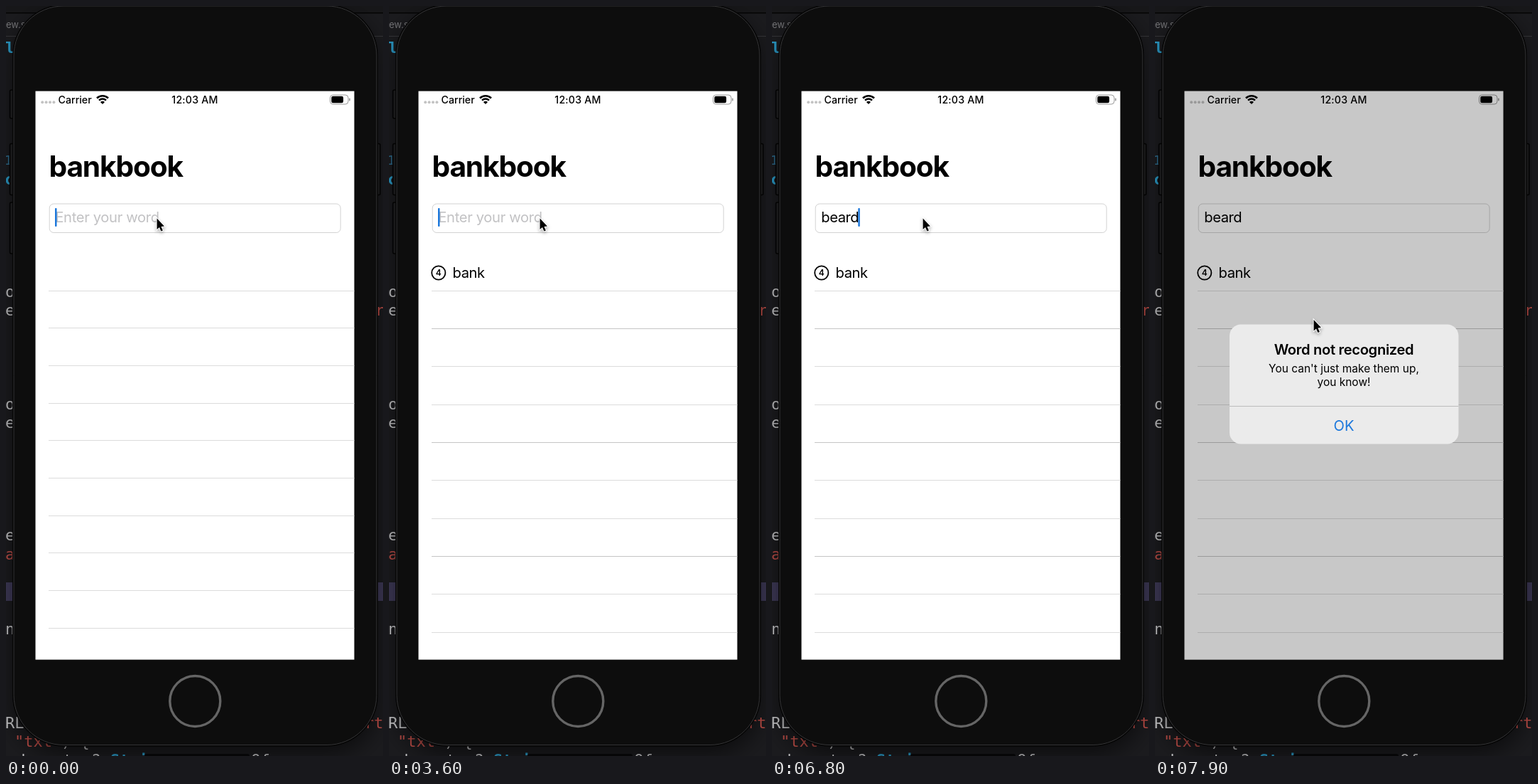
An HTML page with a canvas for the animation above (8 s loop, 531 by 1054 pixels).

```html
<!DOCTYPE html>
<html lang="en">
<head>
<meta charset="utf-8">
<title>Word game</title>
<style>
html, body { margin: 0; width: 531px; height: 1054px; overflow: hidden; background: #1c1c1f; }
canvas { display: block; }
</style>
</head>
<body>
<canvas id="stage" width="531" height="1054"></canvas>
<script>
const ctx = document.getElementById('stage').getContext('2d');
const LOOP = 8000, STEP = 100;
const UI = 'Inter, "Liberation Sans", sans-serif';
const MONO = '"DejaVu Sans Mono", monospace';
const BLUE = '#1c78dc';
const SCREEN = [41.5, 119.6, 449, 799];

const clamp = v => Math.max(0, Math.min(1, v));
const mix = (a, b, p) => a + (b - a) * p;
const smooth = p => p * p * (3 - 2 * p);

function rect(x, y, w, h, color) {
  ctx.fillStyle = color;
  ctx.fillRect(x, y, w, h);
}

function round(x, y, w, h, r, fill, stroke, line = 1) {
  ctx.beginPath();
  ctx.roundRect(x, y, w, h, r);
  if (fill) { ctx.fillStyle = fill; ctx.fill(); }
  if (stroke) { ctx.strokeStyle = stroke; ctx.lineWidth = line; ctx.stroke(); }
}

function ring(x, y, r, line, color) {
  ctx.beginPath();
  ctx.arc(x, y, r, 0, Math.PI * 2);
  ctx.strokeStyle = color;
  ctx.lineWidth = line;
  ctx.stroke();
}

function text(str, x, y, size, o = {}) {
  ctx.font = `${o.weight || 400} ${size}px ${o.font || UI}`;
  ctx.letterSpacing = (o.gap || 0) + 'px';
  ctx.textAlign = o.align || 'left';
  ctx.fillStyle = o.color || '#000';
  ctx.fillText(str, x, y);
  return ctx.measureText(str).width;
}

const code = (str, x, y, color = '#c9c9cb', weight = 400, size = 22) =>
  text(str, x, y, size, { color, weight, font: MONO });

function drawEditor() {
  rect(0, 0, 531, 1054, '#1c1c1f');
  rect(0, 0, 531, 9, '#18181a');
  rect(0, 9, 531, 1.5, '#050505');
  rect(0, 42, 531, 1, '#38383b');
  rect(0, 810, 531, 26, '#403b5a');
  text('ew.s', 0, 31, 13, { color: '#77777a' });

  const red = '#c4504a', cyan = '#2b9cc9';
  code('l', -1, 66, cyan, 700);
  code('1', -2, 223, '#2f6f92', 400, 17);
  code('c', -2, 251, cyan, 700);
  for (const [ch, y] of [['o', 409], ['e', 435], ['o', 567], ['e', 593], ['e', 751], ['n', 883]])
    code(ch, -1, y);
  code('a', -1, 778, red);
  code('r', 520, 435, red);
  code('RL', -1, 1015);
  code('rt', 505, 1015, red);
  code('"txt"', 12, 1041, red);
  code(') {', 78, 1041);
  code('rds = try? ', 1, 1067);
  code('String', 147, 1067, cyan, 700);
  code('(contentsOf', 226, 1067);
  round(195, 1051, 148, 8, 3, '#09090a');
}

function drawPhone() {
  ctx.save();
  ctx.shadowColor = 'rgba(0,0,0,.6)';
  ctx.shadowBlur = 36;
  ctx.shadowOffsetY = 12;
  round(11, 0, 511, 1038.5, 70, '#0d0d0d');
  ctx.restore();
  for (const [x, y, h] of [[5.5, 118, 40], [5.5, 193.5, 72], [5.5, 276, 72], [518, 193.5, 72]])
    round(x, y, 9, h, 2, '#19191a', '#030303', 1.5);
  round(10.5, -.5, 512, 1039.5, 71, '#0d0d0d', '#050505', 3);
  round(11, 0, 511, 1038.5, 70, '#0d0d0d', '#353537', 1);
  ring(266.3, 977, 35.5, 3.4, '#656565');
}

function drawStatus() {
  for (let i = 0; i < 4; i++) {
    ctx.beginPath();
    ctx.arc(51.2 + i * 5.4, 135.3, 2, 0, 7);
    ctx.fillStyle = '#c3c3c3';
    ctx.fill();
  }
  text('Carrier', 73.5, 136.5, 14.2, { weight: 500 });
  text('12:03 AM', 266, 136.5, 14.2, { weight: 500, align: 'center', gap: .2 });

  const a = -Math.PI * .75, b = -Math.PI * .25;
  for (const r of [11.3, 7]) {
    ctx.beginPath();
    ctx.arc(136, 137.5, r, a, b);
    ctx.strokeStyle = '#000';
    ctx.lineWidth = 2.6;
    ctx.stroke();
  }
  ctx.beginPath();
  ctx.moveTo(136, 138);
  ctx.arc(136, 138, 4.3, a, b);
  ctx.fillStyle = '#000';
  ctx.fill();

  round(456.5, 125, 25.5, 13, 4, null, '#9a9a9a');
  round(458.3, 126.8, 16.8, 9.4, 2.2, '#000');
  round(483.2, 129.5, 1.6, 4, 1, '#9a9a9a');
}

// [time, text in the field]
const typed = [[1200, 'b'], [1400, 'ba'], [1500, 'ban'], [1700, 'bank'], [1900, ''],
  [6300, 'b'], [6500, 'be'], [6600, 'bea'], [6700, 'bear'], [6800, 'beard']];

const fieldText = t => typed.reduce((s, [at, str]) => t >= at ? str : s, '');

// [time, opacity, fades over three steps]
const blinks = [[0, 1], [400, 0, 1], [900, 1, 1], [1200, 1], [1900, 0], [3600, 1], [4100, 0, 1],
  [4600, 1, 1], [5100, 0, 1], [5600, 1, 1], [6100, 0, 1], [6300, 1], [7100, 0]];

function caretAlpha(t) {
  const [at, to, fades] = blinks.findLast(b => t >= b[0]);
  return fades ? mix(1 - to, to, clamp((t - at + STEP) / 300)) : to;
}

function drawField(t) {
  round(61.2, 278, 410, 40.5, 6, '#fff', '#d2d2d2');
  const str = fieldText(t);
  let x = 69;
  if (str) x += text(str, 69.3, 304, 20.2, { gap: -.5 }) - .5;
  else text('Enter your word', 69.3, 304, 20.2, { color: '#c2c2c4', gap: -.35 });
  ctx.globalAlpha = caretAlpha(t);
  round(x, 284, 2.5, 26, 1, BLUE);
  ctx.globalAlpha = 1;
}

function drawList(t) {
  const p = smooth(clamp((t - 1900 + STEP) / 500));
  const pitch = mix(52.67, 53.33, p);
  for (let i = 0; i < 10; i++) {
    const crisp = p === 1 && i % 3 === 1;
    rect(60, Math.round(399.8 + i * pitch), 430.5, 1, crisp ? '#c5c5c5' : '#dcdcdc');
  }
  if (!p) return;
  ctx.save();
  ctx.globalAlpha = p;
  ctx.translate(0, -18 * (1 - p));
  ring(69.8, 375, 9.6, 1.8, '#000');
  text('4', 69.8, 379.4, 12, { weight: 600, align: 'center' });
  text('bank', 89.5, 382, 20.2, { gap: -.4 });
  ctx.restore();
}

function drawAlert(p) {
  rect(...SCREEN, `rgba(0,0,0,${.216 * p})`);
  ctx.save();
  ctx.globalAlpha = p;
  ctx.translate(266, 531.5);
  const s = mix(1.21, 1, p);
  ctx.scale(s, s);
  round(-161, -84, 322.5, 168, 16, '#ebebeb');
  const mid = { align: 'center' };
  text('Word not recognized', 0, -41.5, 20.2, { weight: 600, gap: -.35, ...mid });
  text("You can't just make them up,", 0, -17, 15.5, mid);
  text('you know!', 0, 2, 15.5, mid);
  rect(-161, 30.5, 322.5, 1, '#bcbcbc');
  // the button stays grey until the alert has settled
  text('OK', 0, 65, 20.2, { color: p < .95 ? '#808080' : BLUE, ...mid });
  ctx.restore();
}

function drawCursor(t) {
  const p = smooth(clamp((t - 7300) / 600));
  ctx.save();
  ctx.translate(mix(212.6, 223.6, p), mix(298.5, 441, p));
  ctx.beginPath();
  [[0, 0], [0, 15.5], [3.4, 12.4], [5.8, 18], [8.3, 17], [5.9, 11.4], [10.4, 11]]
    .forEach(([x, y]) => ctx.lineTo(x, y));
  ctx.closePath();
  ctx.shadowColor = 'rgba(0,0,0,.35)';
  ctx.shadowBlur = 4;
  ctx.shadowOffsetY = 2;
  ctx.lineWidth = 2;
  ctx.strokeStyle = '#fff';
  ctx.stroke();
  ctx.shadowColor = 'transparent';
  ctx.fillStyle = '#000';
  ctx.fill();
  ctx.restore();
}

function draw(t) {
  drawEditor();
  drawPhone();
  rect(...SCREEN, '#fff');
  drawStatus();
  text('bankbook', 60.5, 240, 40.7, { weight: 700, gap: -1.15 });
  drawField(t);
  drawList(t);
  if (t >= 7100) {
    const w = (t - 7030) * .023;
    drawAlert(1 - (1 + w) * Math.exp(-w));
  }
  drawCursor(t);
}

const start = performance.now();
function tick() {
  const t = (performance.now() - start) % LOOP;
  draw(Math.floor(t / STEP) * STEP);
  requestAnimationFrame(tick);
}
tick();
</script>
</body>
</html>
```
